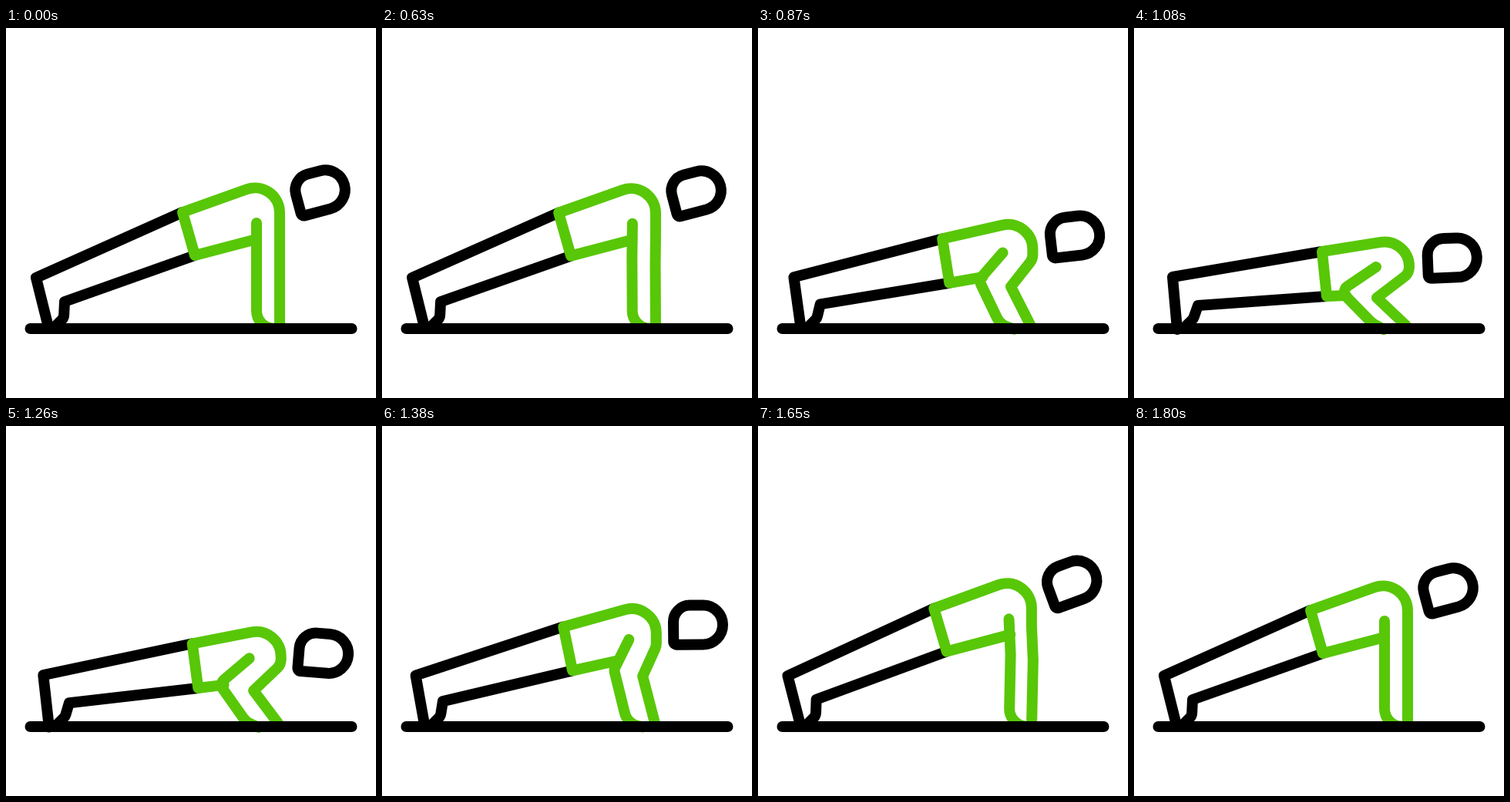
Animation of 480 by 480 pixels, one loop 1830 ms. Source, as an HTML page with a canvas:

```html
<!DOCTYPE html>
<html lang="en">
<head>
<meta charset="utf-8">
<title>Push-up</title>
<style>
  html, body { margin: 0; width: 100%; height: 100%; overflow: hidden; background: #fff; }
  canvas { display: block; width: 100vw; height: 100vh; }
</style>
</head>
<body>
<canvas id="stage" width="480" height="480"></canvas>
<script>
const LOOP = 1830, STEP = 30;
const BLACK = '#000', GREEN = '#58c707';
const ctx = document.getElementById('stage').getContext('2d');
ctx.lineWidth = 14;
ctx.lineCap = ctx.lineJoin = 'round';

const mix = (a, b, u) => a + (b - a) * u;

// A joint travels in a line from its high to its low place; r rounds its corner
const joint = (x, y, lowX, lowY, r = 0) => p => ({ x: mix(x, lowX, p), y: mix(y, lowY, p), r });

const hip = joint(229, 239, 244, 290);
const belly = joint(245, 295, 250, 348);

const limbs = [
  [BLACK, hip, joint(39, 324, 50, 323), joint(55, 388, 56, 391)],
  [BLACK, belly, joint(76, 355, 83, 360), joint(75, 376, 77, 377, 10), joint(63, 388, 66, 388)],
  [GREEN, joint(325, 253, 314, 310), joint(325, 298, 268, 341, 9),
    joint(325, 388, 309, 383, 23), joint(349, 390, 324, 391)],
  [GREEN, joint(325, 274, 275, 347), belly, hip, joint(355, 194, 357, 272, 32),
    joint(355, 262, 357, 318, 16), joint(355, 306, 315, 350), joint(355, 386, 353, 386)]
];

// Sine ease through [time, value] points
function swing(t, points) {
  let [t0, v0] = points[0];
  for (const [t1, v1] of points) {
    if (t < t1) {
      const u = Math.max(0, (t - t0) / (t1 - t0));
      return mix(v0, v1, (1 - Math.cos(Math.PI * u)) / 2);
    }
    [t0, v0] = [t1, v1];
  }
  return v0;
}

const bend = t => swing(t, [[600, 0], [1040, 1], [1155, 1], [1580, -.06], [1800, 0]]);
const nod = t => swing(t, [[1060, 0], [1335, 11], [1550, -7], [1800, 0]]);

function stroke(color, trace) {
  ctx.strokeStyle = color;
  ctx.beginPath();
  trace();
  ctx.stroke();
}

function drawLimb([color, ...joints], p) {
  const pts = joints.map(at => at(p));
  const end = pts.at(-1);
  stroke(color, () => {
    ctx.moveTo(pts[0].x, pts[0].y);
    for (let i = 1; i < pts.length - 1; i++) {
      const a = pts[i], b = pts[i + 1];
      ctx.arcTo(a.x, a.y, b.x, b.y, a.r);
    }
    ctx.lineTo(end.x, end.y);
  });
}

// The head follows the body, and its nod lags behind
function drawHead(p, lag) {
  ctx.save();
  ctx.translate(mix(408, 412.8, p), mix(211.5, 298, p) + 1.1 * lag);
  ctx.rotate((mix(-15, -2.5, p) + lag) * Math.PI / 180);
  stroke(BLACK, () => ctx.roundRect(-32, -25.5, 64, 51, [21.5, 25.5, 25.5, 4]));
  ctx.restore();
}

function draw(time) {
  const t = Math.floor(time / STEP) * STEP;
  const p = bend(t);
  ctx.fillStyle = '#fff';
  ctx.fillRect(0, 0, 480, 480);
  for (const limb of limbs) drawLimb(limb, p);
  drawHead(p, nod(t));
  stroke(BLACK, () => {
    ctx.moveTo(31.5, 390);
    ctx.lineTo(448.5, 390);
  });
}

const start = performance.now();
function tick() {
  draw((performance.now() - start) % LOOP);
  requestAnimationFrame(tick);
}
tick();
</script>
</body>
</html>
```
